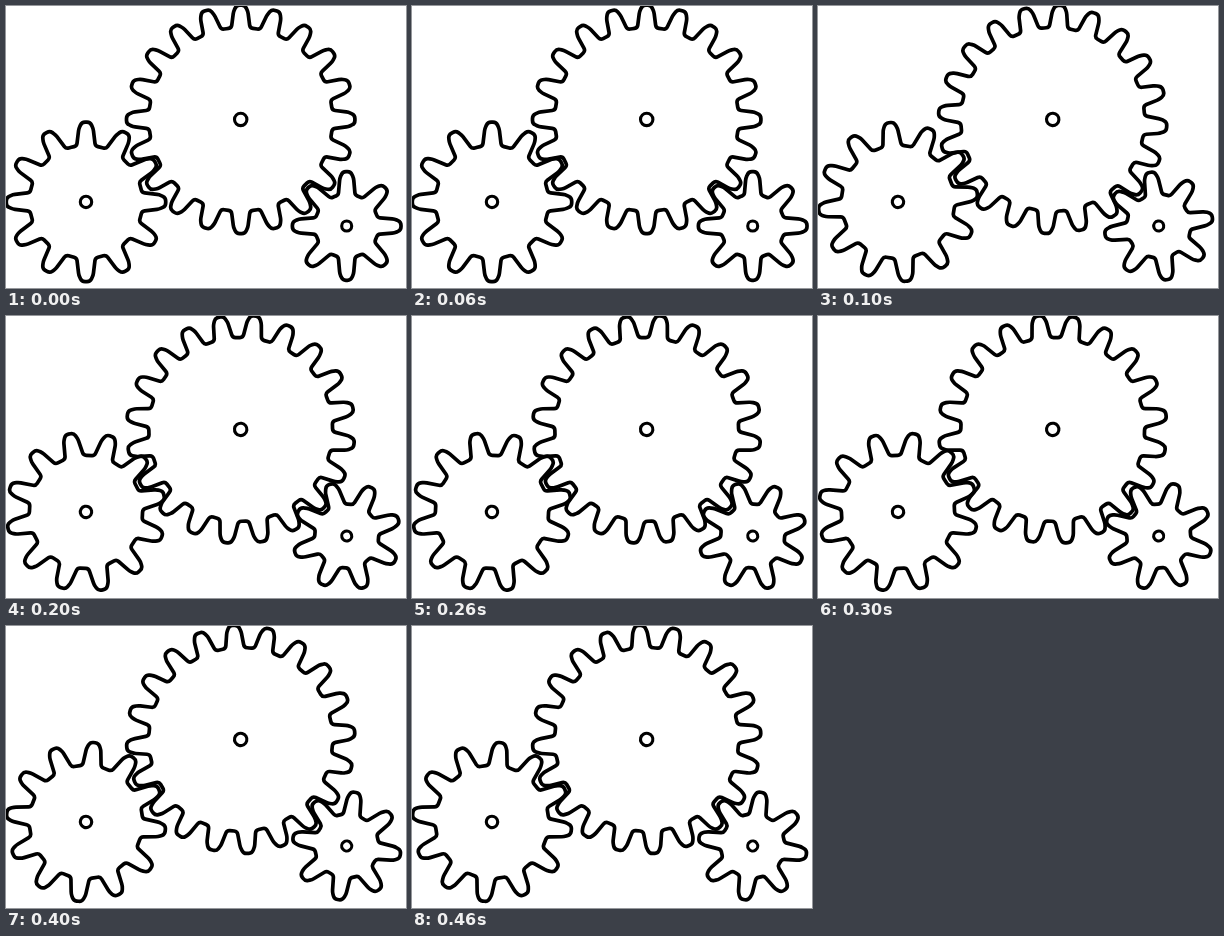
An HTML page with a canvas that plays this animation: 400 by 282 pixels, repeating every 0.5 s.

```html
<!DOCTYPE html>
<html>
<head>
<meta charset="utf-8">
<title>Meshing gears</title>
<style>
  html, body { margin: 0; width: 100%; height: 100%; overflow: hidden; background: #fff; }
  canvas { display: block; }
</style>
</head>
<body>
<canvas id="stage" width="400" height="282"></canvas>
<script>
const ctx = document.getElementById('stage').getContext('2d');
const LOOP = 500;
const STEPS = 5;

// base, side and tip are half widths of a tooth; spin is the turning direction
const gears = [
  { x: 234.7, y: 113.4, teeth: 20, root: 91.5, outer: 114.2, base: 9.3, side: 7.2, tip: 4.2, hub: 6.2, spin: 1 },
  { x: 80, y: 195.9, teeth: 12, root: 56, outer: 79.7, base: 9.3, side: 7.2, tip: 4.2, hub: 5.7, spin: -1 },
  { x: 340.7, y: 220, teeth: 8, root: 31, outer: 54.3, base: 8.4, side: 6.9, tip: 4, hub: 5, spin: -1 }
];

function outline({ teeth, root, outer, base, side, tip }) {
  const half = [[base, root, 4], [side, outer - 6.5, 14], [tip, outer, 5]];
  const tooth = [
    ...half.map(([w, h, r]) => [-w, -h, r]),
    ...half.map(([w, h, r]) => [w, -h, r]).reverse()
  ];
  const corners = [];
  for (let i = 0; i < teeth; i++) {
    const a = i * 2 * Math.PI / teeth;
    const c = Math.cos(a), s = Math.sin(a);
    for (const [x, y, r] of tooth) corners.push([x * c - y * s, x * s + y * c, r]);
  }
  const path = new Path2D();
  const n = corners.length;
  const first = corners[0], last = corners[n - 1];
  path.moveTo((first[0] + last[0]) / 2, (first[1] + last[1]) / 2);
  corners.forEach(([x, y, r], i) => {
    const next = corners[(i + 1) % n];
    path.arcTo(x, y, next[0], next[1], r);
  });
  path.closePath();
  return path;
}

for (const gear of gears) {
  gear.path = outline(gear);
  gear.hole = new Path2D();
  gear.hole.arc(0, 0, gear.hub, 0, 2 * Math.PI);
}

function draw(now) {
  // Every gear advances one tooth per loop, in discrete steps
  const progress = Math.floor((now % LOOP) / LOOP * STEPS) / STEPS;
  ctx.fillStyle = '#fff';
  ctx.fillRect(0, 0, 400, 282);
  ctx.strokeStyle = '#000';
  ctx.lineJoin = 'round';
  for (const gear of gears) {
    ctx.save();
    ctx.translate(gear.x, gear.y);
    ctx.rotate(gear.spin * progress * 2 * Math.PI / gear.teeth);
    ctx.lineWidth = 3.7;
    ctx.stroke(gear.path);
    ctx.lineWidth = 3.1;
    ctx.stroke(gear.hole);
    ctx.restore();
  }
}

const start = performance.now();
function tick() {
  draw(performance.now() - start);
  requestAnimationFrame(tick);
}
tick();
</script>
</body>
</html>
```
